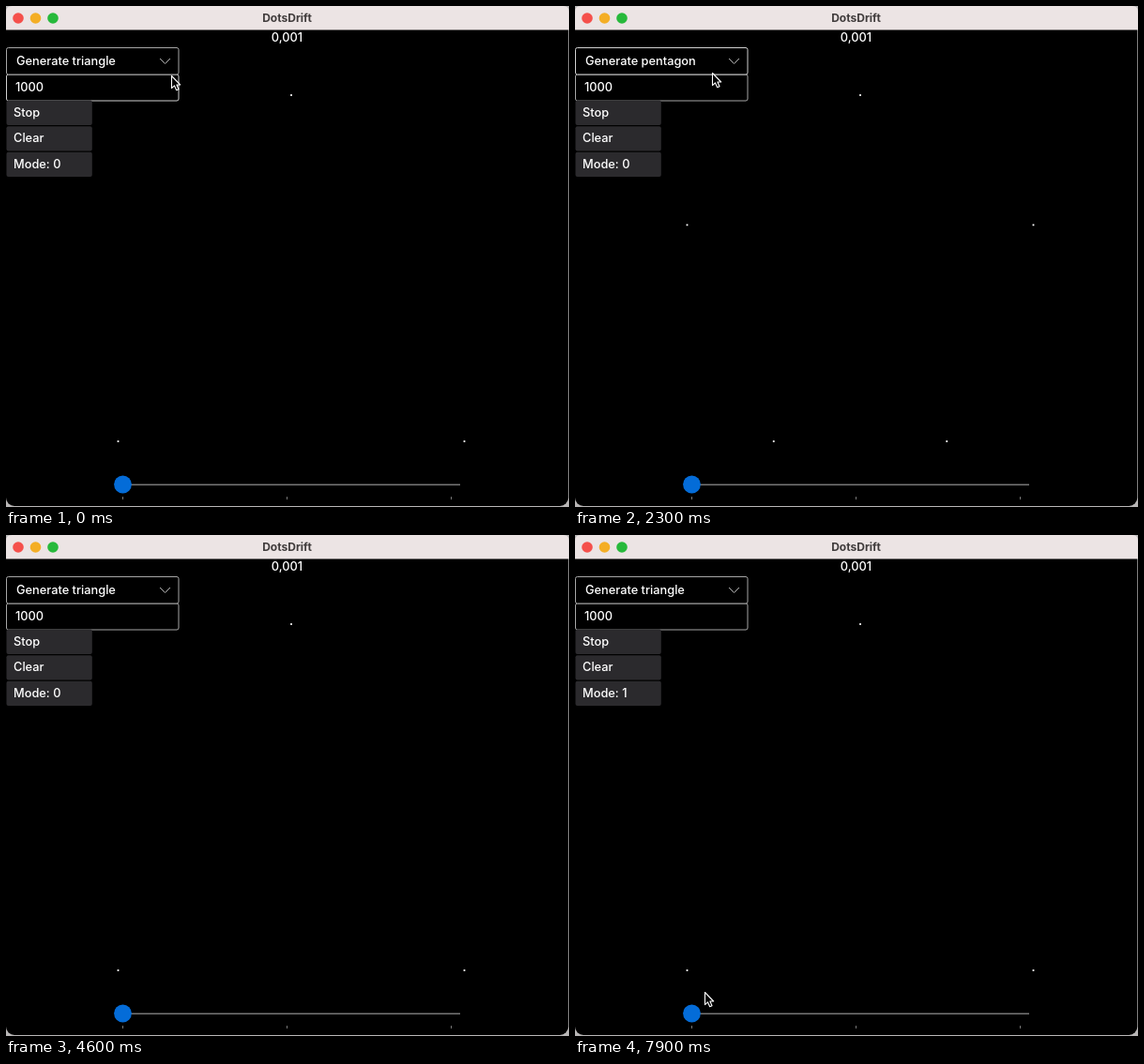
Write an HTML page that moves like this. It is 600 px wide and 534 px high and loops after 8 s.

```html
<!DOCTYPE html>
<html lang="en">
<head>
<meta charset="utf-8">
<title>DotsDrift</title>
<style>
  html, body { margin: 0; width: 100%; height: 100%; overflow: hidden; background: #b9b7b7; }
  svg { display: block; width: 600px; height: 534px; }
  text { font: 500 12.8px Inter, "Open Sans", sans-serif; fill: #fff; white-space: pre; }
  .title { font-size: 12px; font-weight: 700; fill: #403c3c; }
  .mid { text-anchor: middle; }
  .field { fill: #000; stroke: #a6a6a6; }
  .field.hover { stroke: #d0d0d0; }
  .button rect { fill: #2b2a2d; }
  .button.hover rect { fill: #414043; }
  .button.pressed rect { fill: #5c5b5e; }
  .button.pressed { transform: scale(.98); transform-box: fill-box; transform-origin: center; }
  .item rect { fill: transparent; }
  .item.selected rect { fill: #0061b4; }
</style>
</head>
<body>
<svg viewBox="0 0 600 534">
  <rect width="599.3" height="533" rx="9"/>
  <path d="M0 25.5V6Q0 0 6 0H594Q600 0 600 6V25.5Z" fill="#ece4e4"/>
  <g id="lights"></g>
  <text class="title mid" x="299.5" y="17">DotsDrift</text>
  <text class="mid" x="299.5" y="38.2">0,001</text>

  <g id="dots" fill="#fff"></g>

  <path d="M124.5 510.2H484" stroke="#777" stroke-width="1.5"/>
  <path d="M124.5 523v3m175-3v3m175-3v3" stroke="#777"/>
  <circle cx="124.5" cy="510" r="9.4" fill="#046cd8"/>

  <rect id="input" class="field" x=".5" y="73" width="183.5" height="28" rx="2"/>
  <text x="10" y="91">1000</text>
  <g id="buttons"></g>

  <rect id="combo" class="field" x=".5" y="44.5" width="183.5" height="28.5" rx="2"/>
  <text id="choice" x="11" y="63"></text>
  <path d="M164 56l5.5 5.5 5.5-5.5" fill="none" stroke="#b4b4b4"/>

  <g id="menu">
    <path d="M0 73.8H184.5V264Q184.5 268.3 180 268.3H4Q0 268.3 0 264Z" fill="#232225"/>
  </g>

  <g id="pointer">
    <g id="ring" fill="none">
      <circle r="19" stroke="#333" stroke-width="3.5"/>
      <circle r="19.7" stroke="#ddd"/>
      <circle r="17.5" stroke="#aaa" stroke-width=".8"/>
    </g>
    <path d="M.5 .5V13.6L3.5 10.9 5.7 15.8 8 14.8 5.9 10H9.7Z" stroke="#fff" stroke-width="1.1" stroke-linejoin="round"/>
  </g>
</svg>
<script>
const LOOP = 8000, STEP = 100, TRAVEL = 500, PRESS = 200;
const FIELD = 28.5, ROW = 26.75, BUTTON = 27.6, SIDE = 369;
const $ = id => document.getElementById(id);
const show = (node, visible) => node.style.display = visible ? '' : 'none';

function add(parent, tag, attrs, text = '') {
  const node = document.createElementNS('http://www.w3.org/2000/svg', tag);
  for (const key in attrs) node.setAttribute(key, attrs[key]);
  node.textContent = text;
  return parent.appendChild(node);
}

['#f5504b', '#f4ae25', '#27b93b'].forEach((fill, i) =>
  add($('lights'), 'circle', { cx: 13 + 18.5 * i, cy: 13, r: 5.8, fill }));

const shapes = ['triangle', 'pentagon', 'hexagon', 'octagon', 'square', 'square 2', 'square 3'];
const items = shapes.map((name, i) => {
  const y = 76.8 + i * ROW, g = add($('menu'), 'g', { class: 'item' });
  add(g, 'rect', { x: 0, y, width: 184, height: ROW });
  add(g, 'text', { x: 11, y: y + 17.8 }, 'Generate ' + name);
  return g;
});

const buttons = ['Stop', 'Clear', 'Mode: 0'].map((label, i) => {
  const y = 100.6 + i * BUTTON, g = add($('buttons'), 'g', { class: 'button' });
  add(g, 'rect', { x: .5, y, width: 91.3, height: 26.3, rx: 2 });
  add(g, 'text', { x: 8, y: y + 17 }, label);
  return g;
});

// Each polygon is an apex plus mirrored pairs: [half-width, height] in units of SIDE.
const dotGroups = [[[.5, 1]], [[.5, .375], [.25, 1]]].map(pairs => {
  const g = add($('dots'), 'g', {});
  const dot = (x, y) => add(g, 'rect', { x: 303.1 + x * SIDE, y: 94.1 + y * SIDE, width: 1.8, height: 1.8 });
  dot(0, 0);
  pairs.forEach(([x, y]) => { dot(-x, y); dot(x, y); });
  return g;
});

// Pointer stops: arrival time, x, y
const stops = [
  [0, 176, 74], [300, 173, 64], [1000, 148, 113], [2300, 146, 71], [3700, 117, 110],
  [4300, 95, 91], [4600, -24, 88], [5400, 60, 86], [6300, 46, 171], [7300, 109, 273], [7900, 138, 487]
];
// Open menu, pick pentagon, open menu, pick triangle, change mode
const clicks = [500, 1900, 2800, 4400, 6800];

function pointerAt(t) {
  const next = Math.max(1, stops.findIndex(stop => stop[0] >= t));
  const [t0, x0, y0] = stops[next - 1], [t1, x1, y1] = stops[next];
  const k = Math.max(0, 1 - (t1 - t) / Math.min(TRAVEL, t1 - t0));
  const ease = k * k * (3 - 2 * k);
  return [x0 + (x1 - x0) * ease, y0 + (y1 - y0) * ease];
}

function draw(t) {
  const [x, y] = pointerAt(t);
  const over = (top, width, height) => x >= 0 && x < width && y >= top && y < top + height;
  const done = clicks.filter(click => t >= click).length;
  const pressed = clicks[done] - t <= PRESS;
  const open = done === 1 || done === 3;
  const selected = done >> 1 === 1 ? 1 : 0;

  $('pointer').setAttribute('transform', `translate(${x} ${y})`);
  show($('ring'), pressed);
  show($('menu'), open);
  $('choice').textContent = 'Generate ' + shapes[selected];
  $('combo').classList.toggle('hover', open || over(44, 184, FIELD));
  $('input').classList.toggle('hover', !open && over(73, 184, FIELD));

  dotGroups.forEach((g, i) => show(g, i === selected));
  items.forEach((g, i) => g.classList.toggle('selected', i === selected));
  buttons.forEach((g, i) => {
    const hover = !open && over(101 + i * BUTTON, 92, BUTTON);
    g.classList.toggle('hover', hover);
    g.classList.toggle('pressed', hover && pressed);
  });
  buttons[2].lastChild.textContent = 'Mode: ' + (done === clicks.length ? 1 : 0);
}

const start = performance.now();
function tick() {
  const t = (performance.now() - start) % LOOP;
  draw(Math.floor(t / STEP) * STEP);
  requestAnimationFrame(tick);
}
tick();
</script>
</body>
</html>
```
